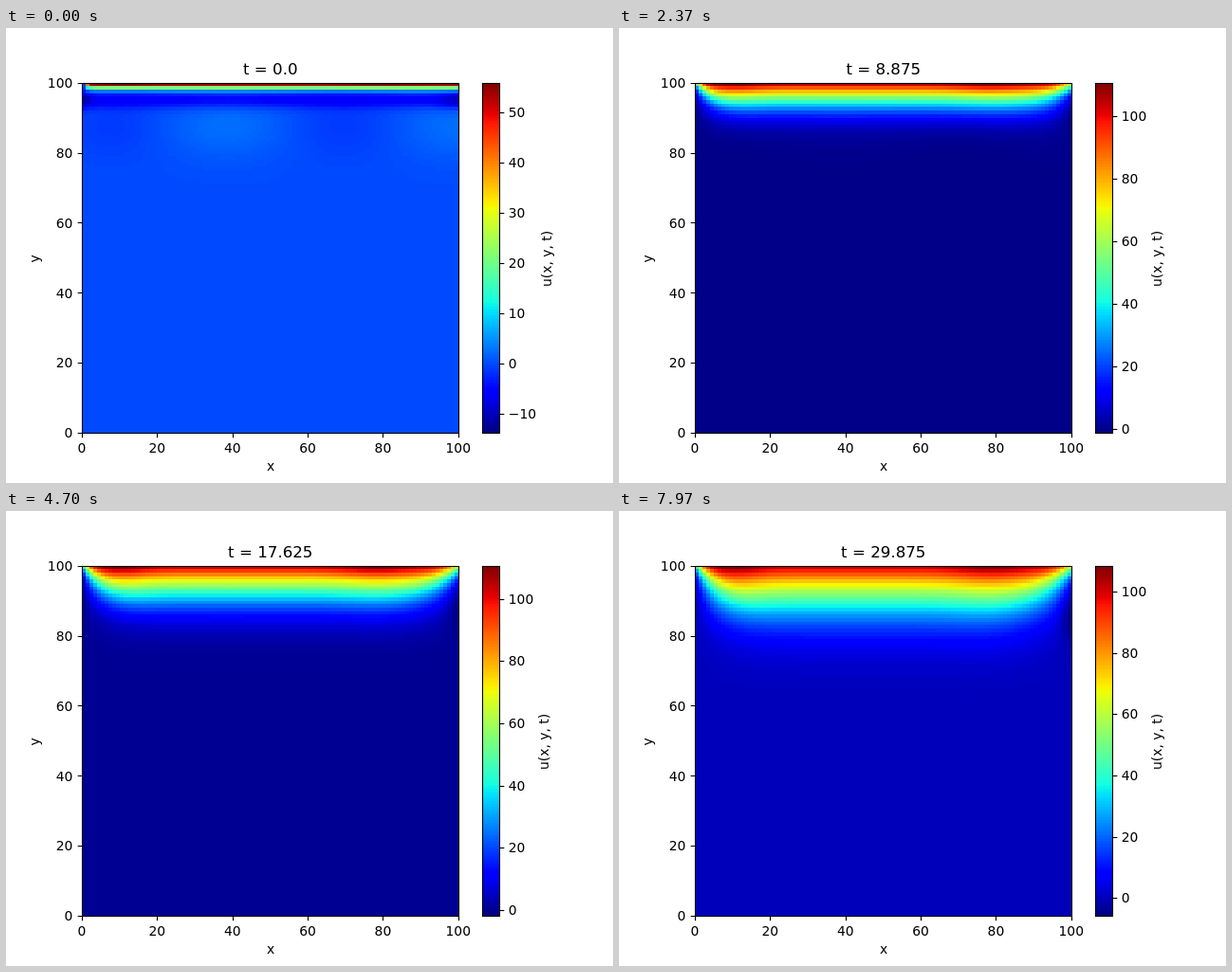
Recreate the animation shown at these times as an HTML page with a canvas. Size 640 by 480 pixels, loop 8000 ms.

```html
<!DOCTYPE html>
<html lang="en">
<head>
<meta charset="utf-8">
<title>Heat field</title>
<style>
  html, body { margin: 0; width: 100%; height: 100%; overflow: hidden; background: #fff; }
  canvas, svg { position: absolute; left: 0; top: 0; }
  text { font: 13.89px "DejaVu Sans", sans-serif; }
  #title { font-size: 16.67px; }
  path, rect { fill: none; stroke: #000; stroke-width: 1.11; }
</style>
</head>
<body>
<canvas id="stage" width="640" height="480"></canvas>
<svg width="640" height="480" viewBox="0 0 640 480">
  <g id="axes"></g>
  <g id="scale"></g>
  <text id="title" x="278.8" y="49.3" text-anchor="middle"></text>
</svg>
<script>
const LOOP = 8000, N = 100;
const PLOT = { x: 80, y: 57.6, w: 396.8, h: 369.6 };
const BAR = { x: 501.6, y: 57.6, w: 18.48, h: 369.6 };
const byId = id => document.getElementById(id);
const ctx = byId("stage").getContext("2d");
ctx.imageSmoothingEnabled = false;

const clamp = (v, lo = 0, hi = 1) => Math.max(lo, Math.min(hi, v));
const bell = (v, centre, width) => Math.exp(-(((v - centre) / width) ** 2));

// Straight lines through a few [time, value] points.
function curve(points, t) {
  const i = Math.max(1, points.findIndex(p => p[0] >= t));
  const [t0, v0] = points[i - 1], [t1, v1] = points[i];
  return v0 + (v1 - v0) * (t - t0) / (t1 - t0);
}
const HIGH = [[0, 55.9], [2, 102], [5, 112.2], [9, 110.7], [16, 111], [30, 108.5]];
const LOW = [[0, -13.8], [2, -5.5], [5, -1.9], [11, -0.75], [16, -1.1], [21, -3.5], [30, -5.9]];

// Each jet channel ramps up from a to b and down from c to d.
const ramp = (v, a, b, c, d) =>
  Math.round(255 * clamp(Math.min((v - a) / (b - a), (d - v) / (d - c))));
const jet = v => [
  ramp(v, 0.35, 0.66, 0.89, 1.11),
  ramp(v, 0.125, 0.375, 0.64, 0.91),
  ramp(v, -0.11, 0.11, 0.34, 0.65)
];
const JET = Array.from({ length: 256 }, (_, i) => jet(i / 255));

function erf(x) {
  const k = 1 / (1 + 0.47047 * Math.abs(x));
  const y = 1 - k * (0.3480242 + k * (-0.0958798 + k * 0.7478556)) * Math.exp(-x * x);
  return x < 0 ? -y : y;
}

function pixels(w, h) {
  const canvas = document.createElement("canvas");
  canvas.width = w;
  canvas.height = h;
  const c = canvas.getContext("2d"), image = c.createImageData(w, h);
  return {
    canvas,
    set(i, level) { image.data.set([...JET[level], 255], i * 4); },
    flush() { c.putImageData(image, 0, 0); }
  };
}
const field = pixels(N, N), bar = pixels(1, 256);
for (let i = 0; i < 256; i++) bar.set(i, 255 - i);
bar.flush();

function drawField(t, low, high) {
  const reach = Math.hypot(1.7, 2.58 * t ** 0.555);
  const settle = 1 - Math.exp(-t);
  const middle = high * (0.925 + 0.03 * Math.exp(-t / 8));
  const leftWidth = 1.2 + 2 * settle + 0.025 * t;
  const rightWidth = 2 + 4.5 * settle;
  // Edge layers widen with depth until they match the diffusion length.
  const spread = (w, d) => w + Math.min(d * 0.55, Math.max(0, reach - w));

  // Initial ripples: a dark band under the hot edge and a slow swell.
  const undershoot = Array.from({ length: N }, (_, x) =>
    -(6 + 5 * (bell(x, 0, 2) + bell(x, 99, 5))) * Math.exp(-t / 2.5));
  const swell = Array.from({ length: N }, (_, x) =>
    (0.7 + 1.8 * Math.cos(2 * Math.PI * (x - 38) / 62)) * Math.exp(-t / 6));

  for (let d = 0; d < N; d++) {
    const heat = 1 - erf(d / reach);
    const wl = spread(leftWidth, d), wr = spread(rightWidth, d);
    const leftGap = 1.5 * settle * Math.exp(-d / 4), rightGap = 4 * Math.exp(-d / 5);
    const band = bell(d, 4.5, 2.3), wave = bell(d, 12, 9);
    const dip = 0.8 * low * settle * bell(d, 8 + t * 0.2, 4 + t * 0.1);
    for (let x = 0; x < N; x++) {
      const fromRight = N - 1 - x;
      const top = middle + (high - middle) * (bell(x, 10, 8) + bell(x, 78, 10));
      const sides = erf((x + leftGap) / wl) * erf((fromRight + rightGap) / wr);
      const u = top * heat * sides + undershoot[x] * band + swell[x] * wave
        + dip * bell(fromRight, 0, 2.5);
      field.set(d * N + x, clamp(Math.floor(256 * (u - low) / (high - low)), 0, 255));
    }
  }
  field.flush();
}

const snap = v => Math.round(v) + 0.5;
const label = (x, y, anchor, s) => `<text x="${x}" y="${y}" text-anchor="${anchor}">${s}</text>`;
const upright = (x, s) =>
  `<text transform="translate(${x} 243.4) rotate(-90)" text-anchor="middle">${s}</text>`;
function frameBox({ x, y, w, h }) {
  const l = snap(x), t = snap(y);
  return `<rect x="${l}" y="${t}" width="${snap(x + w) - l}" height="${snap(y + h) - t}"/>`;
}

function buildAxes() {
  let out = frameBox(PLOT) + frameBox(BAR);
  for (let v = 0; v <= 100; v += 20) {
    const x = PLOT.x + PLOT.w * v / 100, y = PLOT.y + PLOT.h * (1 - v / 100);
    out += `<path d="M${snap(x)} 427.5v4.86M80.5 ${snap(y)}h-4.86"/>`;
    out += label(x, 448, "middle", v) + label(70.3, y + 5.2, "end", v);
  }
  byId("axes").innerHTML = out + label(279, 467, "middle", "x") + upright(35, "y");
}

function drawScale(low, high) {
  const step = high - low > 90 ? 20 : 10;
  let out = "", widest = 0;
  for (let v = Math.ceil(low / step) * step; v <= high; v += step) {
    const y = BAR.y + BAR.h * (high - v) / (high - low);
    const s = String(Math.abs(v));
    out += `<path d="M520.5 ${snap(y)}h4.86"/>`;
    out += label(529.8, Math.round(y) + 5, "start", (v < 0 ? "\u2212" : "") + s);
    widest = Math.max(widest, 8.84 * s.length + (v < 0 ? 11.64 : 0));
  }
  byId("scale").innerHTML = out + upright(Math.round(545.8 + widest), "u(x, y, t)");
}

let shown = -1;
function render(now) {
  const ticks = Math.floor((now % LOOP) / 10);
  const step = Math.min(239, Math.floor((ticks + 0.5) * 0.3));
  if (step === shown) return;
  shown = step;
  const t = step * 0.125, low = curve(LOW, t), high = curve(HIGH, t);
  drawField(t, low, high);
  ctx.clearRect(0, 0, 640, 480);
  for (const [source, box] of [[field, PLOT], [bar, BAR]])
    ctx.drawImage(source.canvas, box.x, box.y, box.w, box.h);
  drawScale(low, high);
  byId("title").textContent = "t = " + (Number.isInteger(t) ? t.toFixed(1) : t);
}

buildAxes();
const start = performance.now();
function loop() {
  render(performance.now() - start);
  requestAnimationFrame(loop);
}
loop();
</script>
</body>
</html>
```
